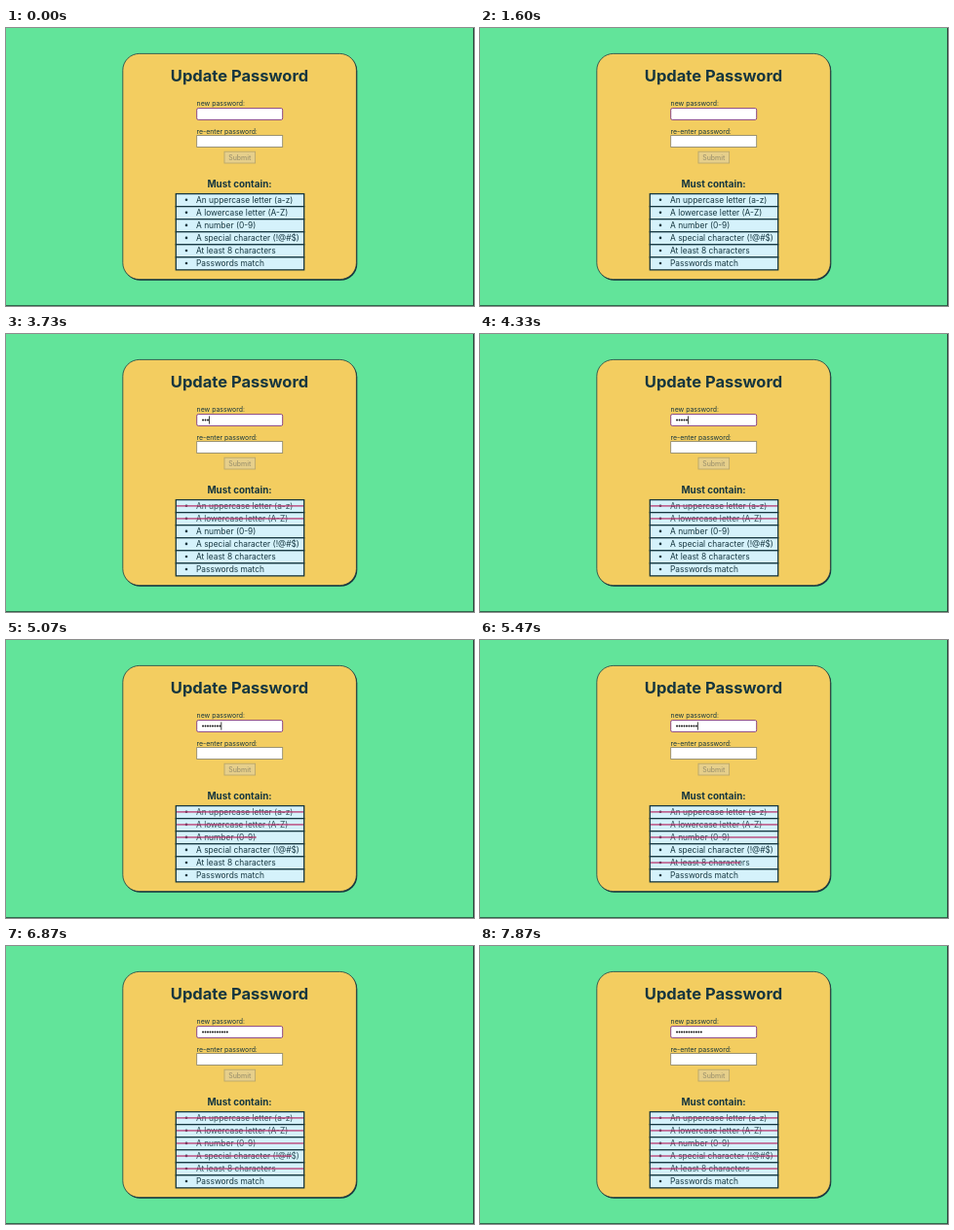
These frames come from a looping animation (480x286 px, 8000 ms). An HTML page:

```html
<!DOCTYPE html>
<html lang="en">
<head>
<meta charset="utf-8">
<title>Update Password</title>
<style>
  html, body { margin: 0; width: 100%; height: 100%; overflow: hidden; background: #62e49a; }
  svg { display: block; width: 480px; height: 286px; font-family: Inter, "Open Sans", sans-serif; fill: #15363f; }
  .bold { font-weight: 700; text-anchor: middle; }
  .label { font-size: 6.9px; }
  .item { font-size: 8.4px; }
</style>
</head>
<body>
<svg id="stage" viewBox="0 0 480 286">
  <rect width="480" height="286" fill="#62e49a"/>
  <path d="M0 285.5H480" stroke="#2f6a4c"/>
  <path d="M479.5 0V286" stroke="#2b4a3e"/>
  <rect x="120.7" y="27.6" width="239.6" height="232.2" rx="17" fill="#15363f"/>
  <rect x="119.8" y="26.4" width="239.6" height="232.2" rx="17" fill="#f3cd60" stroke="#15363f" stroke-width=".75"/>
  <text class="bold" x="239.5" y="54.6" font-size="16.5">Update Password</text>

  <text class="label" x="195.6" y="80.4">new password:</text>
  <rect x="195.7" y="82.6" width="88" height="11.8" rx="1.5" fill="#fff" stroke="#8a4684"/>
  <g id="dots" fill="#111"></g>
  <rect id="caret" y="84.4" width=".8" height="8.2" fill="#111"/>

  <text class="label" x="195.6" y="108.6">re-enter password:</text>
  <rect x="195.7" y="110.6" width="88" height="11.8" fill="#fff" stroke="#858069" stroke-width=".8"/>

  <rect x="224" y="127.2" width="31.6" height="11.8" fill="#e6cf8b" stroke="#b9a66c" stroke-width=".9"/>
  <text x="239.8" y="135.6" font-size="6.9" font-weight="500" text-anchor="middle" fill="#a0956e">Submit</text>

  <text class="bold" x="239.5" y="164.3" font-size="9.85">Must contain:</text>
  <g id="rules"></g>
</svg>
<script>
const LOOP = 8000, STRIKE = 530;
const typed = [2130, 2930, 3670, 3930, 4270, 4600, 4800, 5000, 5470, 5930, 6270];
const rules = [
  ["An uppercase letter (a-z)", 2270],
  ["A lowercase letter (A-Z)", 3070],
  ["A number (0-9)", 4760],
  ["A special character (!@#$)", 6440],
  ["At least 8 characters", 5130],
  ["Passwords match", Infinity]
];
const TABLE = { x: 174.3, y: 170.6, width: 131.4, row: 13.04 };
const DOT_X = 200.8, PITCH = 2.48;

function add(parent, tag, attrs, text = "") {
  const el = document.createElementNS("http://www.w3.org/2000/svg", tag);
  for (const name in attrs) el.setAttribute(name, attrs[name]);
  el.textContent = text;
  return parent.appendChild(el);
}

const byId = id => document.getElementById(id);
const caret = byId("caret");
const dots = typed.map((_, i) =>
  add(byId("dots"), "circle", { cx: DOT_X + (i + .5) * PITCH, cy: 88.5, r: .95 }));

const rows = rules.map(([label, start], i) => {
  const y = TABLE.y + i * TABLE.row;
  add(byId("rules"), "rect", {
    x: TABLE.x, y, width: TABLE.width, height: TABLE.row,
    fill: "#d5f2fb", stroke: "#15363f", "stroke-width": 1.3
  });
  const content = add(byId("rules"), "g", {});
  add(content, "circle", { cx: 185, cy: y + 6.2, r: 1.3 });
  add(content, "text", { class: "item", x: 195, y: y + 9 }, label);
  const line = add(byId("rules"), "rect", { x: TABLE.x + .7, y: y + 5.7, height: 1.2, fill: "#b52a64" });
  return { content, line, start };
});

const clamp = v => Math.max(0, Math.min(1, v));
const ease = p => p * p * (3 - 2 * p);

function caretVisible(t, last) {
  if (last === undefined) return t >= 70 && (t - 70) % 1000 < 530;
  return Math.floor((t - last) / 532) % 2 === 0;
}

function draw(t) {
  const count = typed.filter(time => time <= t).length;
  dots.forEach((dot, i) => dot.setAttribute("visibility", i < count ? "visible" : "hidden"));
  caret.setAttribute("x", DOT_X + count * PITCH - .2);
  caret.setAttribute("visibility", caretVisible(t, typed[count - 1]) ? "visible" : "hidden");
  for (const { content, line, start } of rows) {
    const p = ease(clamp((t - start) / STRIKE));
    line.setAttribute("width", p * (TABLE.width - 1.4));
    content.setAttribute("opacity", 1 - .15 * p);
  }
}

const begin = performance.now();
function tick() {
  draw((performance.now() - begin) % LOOP);
  requestAnimationFrame(tick);
}
tick();
</script>
</body>
</html>
```
